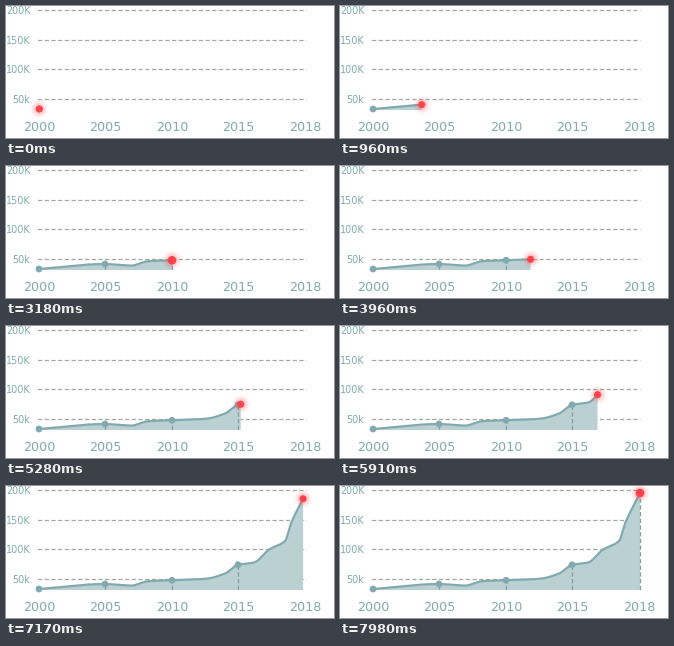
Animation of 328 by 132 pixels, one loop 8 s. Source, as a matplotlib script:

```python
import numpy as np
import matplotlib.pyplot as plt
from matplotlib.animation import FuncAnimation
from matplotlib.patches import Circle, Polygon

W, H, DPI = 328, 132, 100
LOOP, STEP = 8000, 20
PX = 72 / DPI  # points per pixel
TEAL, AREA, GRID, RED = "#80aaae", "#bad0d2", "#a6a6a6", "#fc434c"
BASE, GLOW = 104, 10

STOPS = (33, 99, 166, 232, 300)
YEARS = (2000, 2005, 2010, 2015, 2018)
LEVELS = ("200K", "150K", "100K", "50k")

KEYS = [(33, 103), (99, 98), (125, 99.6), (142, 95.2), (166, 94.3),
        (200, 92.7), (219, 87.5), (232, 78.8), (248, 76.5), (263, 63.6),
        (279, 55), (285, 37.5), (300, 7)]

# each leg starts LEG ms after the one before; the steep last one takes longer
START, LEG, RUN, LAST_RUN = -80, 1700, 1580, 2540


def smooth(points, x):
    """Monotone cubic curve through the points."""
    px, py = np.array(points).T
    h = np.diff(px)
    d = np.diff(py) / h
    left, right = d[:-1], d[1:]
    same = left * right > 0
    total = np.where(same, left + right, 1)
    m = np.r_[d[0], np.where(same, 2 * left * right / total, 0), d[-1]]
    k = np.clip(np.searchsorted(px, x, side="right") - 1, 0, len(h) - 1)
    s = (x - px[k]) / h[k]
    return ((1 + 2 * s) * (1 - s) ** 2 * py[k] + s * (1 - s) ** 2 * h[k] * m[k]
            + s * s * (3 - 2 * s) * py[k + 1] - s * s * (1 - s) * h[k] * m[k + 1])


XS = np.arange(STOPS[0], STOPS[-1] + 0.1, 0.25)
YS = smooth(KEYS, XS)
LENGTH = np.r_[0, np.cumsum(np.hypot(np.diff(XS), np.diff(YS)))]
MARKS = np.interp(STOPS, XS, LENGTH)


def travel(t):
    """Position of the dot at time t, and how far it has swollen at a stop."""
    leg = min(int((t - START) // LEG), len(STOPS) - 2)
    run = LAST_RUN if leg == len(STOPS) - 2 else RUN
    p = np.clip((t - START - leg * LEG) / run, 0, 1)
    ease = (1 - np.cos(np.pi * p)) / 2
    s = MARKS[leg] + ease * (MARKS[leg + 1] - MARKS[leg])
    swell = np.clip((p - 0.9) / 0.08, 0, 1)
    return np.interp(s, LENGTH, XS), np.interp(s, LENGTH, YS), swell


def dashed(xs, ys, color, z):
    return ax.plot(xs, ys, color=color, lw=1.2 * PX, zorder=z, snap=False,
                   dashes=(4.3 / 1.2, 2.4 / 1.2), dash_capstyle="butt")[0]


def disc(x, y, r, color, z):
    return ax.add_patch(Circle((x, y), r, fc=color, ec="none", zorder=z))


plt.rcParams["font.family"] = "DejaVu Sans"
fig = plt.figure(figsize=(W / DPI, H / DPI), dpi=DPI, facecolor="white")
ax = fig.add_axes([0, 0, 1, 1])
ax.axis("off")

for i, name in enumerate(LEVELS):
    y = 4.5 + round(i * 89 / 3)
    dashed([32, 300.5], [y, y], GRID, 1)
    ax.text(24.5, y + 3.4, name, color=TEAL, size=9.6 * PX, ha="right")

stops = []
for x, year in zip(STOPS, YEARS):
    y = np.interp(x, XS, YS)
    ax.text(min(x + 0.4, 299.3), 125.3, year, color=TEAL, size=12.7 * PX, ha="center")
    drop = dashed([x + 0.5] * 2, [BASE, y], "#7f9fa4", 3)
    stops.append((x, disc(x, y, 3.4, TEAL, 5), drop))

area = ax.add_patch(Polygon([(33, BASE)] * 3, fc=AREA, ec="none", zorder=2))
line, = ax.plot([], [], color=TEAL, lw=2.2 * PX, zorder=4, solid_capstyle="round")

v = np.linspace(-1, 1, 61)
dist = np.hypot(*np.meshgrid(v, v))
halo = np.ones((61, 61, 4))
halo[..., :3] = 1, 0.27, 0.31
halo[..., 3] = 0.6 * np.clip(1 - dist, 0, 1) ** 1.4
glow = ax.imshow(halo, extent=(0, 1, 0, 1), zorder=6, aspect="auto")
dot = disc(33, 103, 3.5, RED, 7)

ax.set_xlim(0, W)
ax.set_ylim(H, 0)


def draw(i):
    x, y, swell = travel(i * STEP)
    seen = XS < x
    lx, ly = np.r_[XS[seen], x], np.r_[YS[seen], y]
    line.set_data(lx, ly)
    area.set_xy(np.column_stack([np.r_[33, lx, x], np.r_[BASE, ly, BASE]]))
    for sx, mark, drop in stops:
        mark.set_visible(x >= sx - 0.5)
        drop.set_visible(sx > STOPS[0] and x >= sx - 1.5)
    dot.center = x, y
    dot.radius = 3.5 + 0.8 * swell
    g = GLOW + swell
    glow.set_extent((x - g, x + g, y + g, y - g))
    ax.set_xlim(0, W)
    ax.set_ylim(H, 0)
    return area, line, glow, dot


anim = FuncAnimation(fig, draw, frames=LOOP // STEP, interval=STEP,
                     init_func=lambda: draw(0), repeat=True, repeat_delay=0)
plt.show()
```
